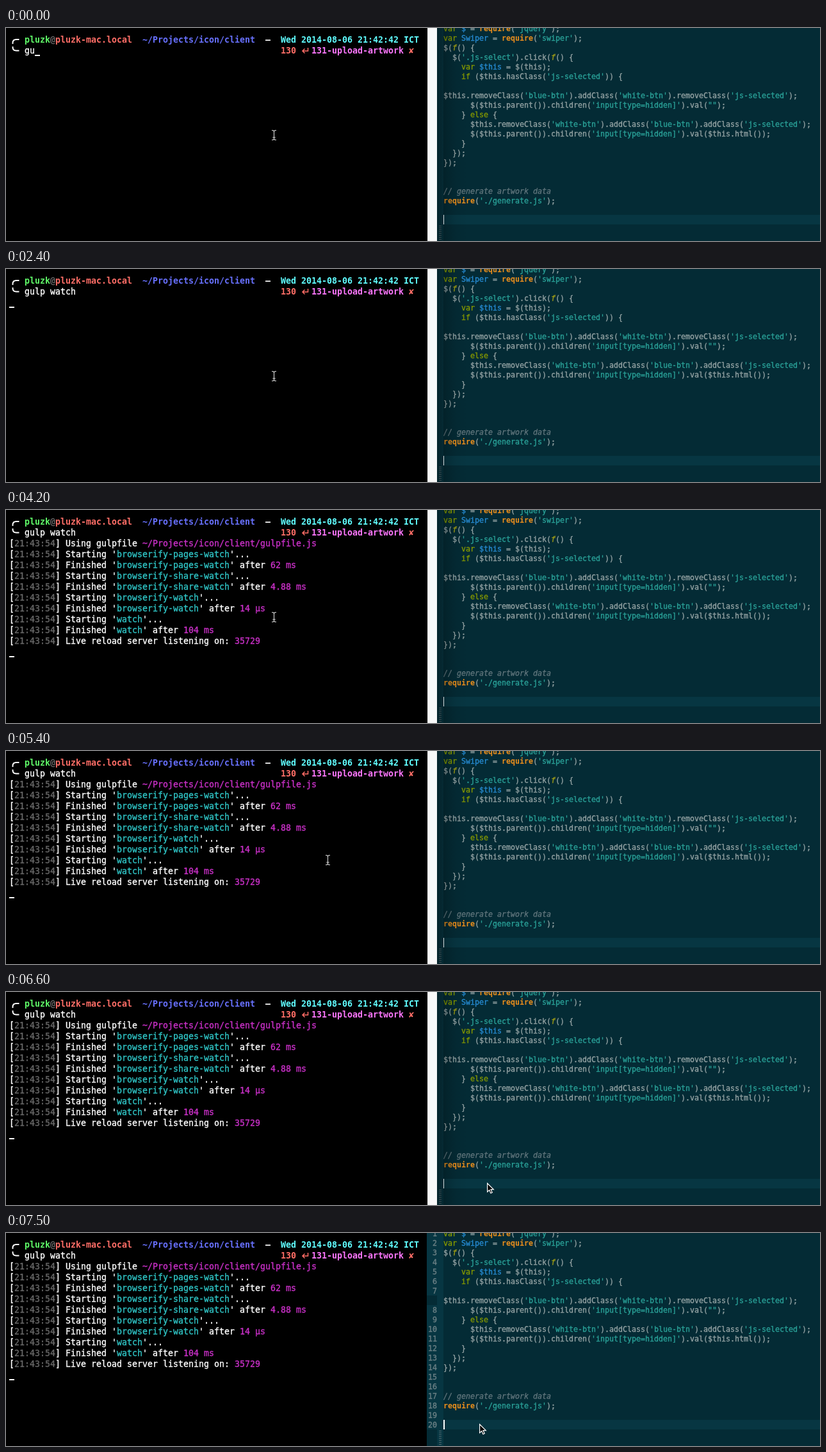
These frames come from a looping animation (1271x334 px, 8 s). An HTML page with a canvas:

```html
<!DOCTYPE html>
<html lang="en">
<head>
<meta charset="utf-8">
<title>Terminal and editor</title>
<style>
  html, body { margin: 0; width: 100%; height: 100%; overflow: hidden; background: #000; }
  canvas { display: block; }
</style>
</head>
<body>
<canvas id="stage" width="1271" height="334"></canvas>
<script>
const W = 1271, H = 334, LOOP = 8000;
const ctx = document.getElementById('stage').getContext('2d');

const MONO = '"DejaVu Sans Mono", monospace';
const TERM = { cell: 8, size: 13.29, x: 5, base: 23, row: 17 };
const EDIT = { cell: 7, size: 11.63, x: 683, base: 5, row: 15 };

const white = '#ffffff', gray = '#686868', red = '#ff6e67', magenta = '#c930c7', cyan = '#2fc3c4';
const panel = '#042b35', raised = '#073642', body = '#93a2a3', muted = '#5f747b';

// Each change: [time, value]; the value holds until the next one.
const TYPED = [[0, 2], [150, 3], [300, 4], [900, 5], [1050, 6], [1200, 7], [1500, 8], [1650, 9], [1800, 10]];
const PRINTED = [[0, 0], [4050, 8], [4200, 10]];
const POINTER = [
  [0, ['beam', 418, 168]], [5400, ['beam', 502, 171]],
  [5550, ['arrow', 830, 191]], [5700, ['arrow', 850, 236]], [5850, ['arrow', 790, 277]],
  [6000, ['arrow', 751, 289]], [6450, ['arrow', 751, 293]], [6600, ['arrow', 751, 299]],
  [7050, ['arrow', 744, 299]], [7200, ['arrow', 741, 299]], [7500, ['arrow', 739, 299]]
];
const ENTER = 2400, FOCUS = 6750;
const COMMAND = 'gulp watch';

const PROMPT = [
  [0, 3, 'pluzk', '#5ffa68'], [0, 8, '@', gray], [0, 9, 'pluzk-mac.local', red],
  [0, 26, '~/Projects/icon/client', '#6871ff'], [0, 50, '–', white],
  [0, 53, 'Wed 2014-08-06 21:42:42 ICT', '#60fdff'],
  [1, 53, '130', red], [1, 59, '131-upload-artwork', '#ff77ff'], [1, 78, '✘', red]
];

const LOG = [
  'Using gulpfile ~/Projects/icon/client/gulpfile.js',
  "Starting 'browserify-pages-watch'...",
  "Finished 'browserify-pages-watch' after 62 ms",
  "Starting 'browserify-share-watch'...",
  "Finished 'browserify-share-watch' after 4.88 ms",
  "Starting 'browserify-watch'...",
  "Finished 'browserify-watch' after 14 µs",
  "Starting 'watch'...",
  "Finished 'watch' after 104 ms",
  'Live reload server listening on: 35729'
].map(line => '[21:43:54] ' + line);

const CODE = [
  "var $ = require('jquery');",
  "var Swiper = require('swiper');",
  "$(f() {",
  "  $('.js-select').click(f() {",
  "    var $this = $(this);",
  "    if ($this.hasClass('js-selected')) {",
  "",
  "$this.removeClass('blue-btn').addClass('white-btn').removeClass('js-selected');",
  "      $($this.parent()).children('input[type=hidden]').val(\"\");",
  "    } else {",
  "      $this.removeClass('white-btn').addClass('blue-btn').addClass('js-selected');",
  "      $($this.parent()).children('input[type=hidden]').val($this.html());",
  "    }",
  "  });",
  "});",
  "", "",
  "// generate artwork data",
  "require('./generate.js');"
];

const LOG_RULES = [
  [/(?<=\[)[\d:]+(?=\])/g, gray],
  [/(?<=')[\w-]+(?=')/g, cyan],
  [/~\S+|\d[\d.]*( [mµ]s)?$/g, magenta]
];
const CODE_RULES = [
  [/\b(var|if|else)\b/g, '#859900'],
  [/(?<=var )\S+/g, '#268bd2'],
  [/\brequire\b/g, '#ed8f1c', 'bold'],
  [/(?<=\()f(?=\()/g, '#a3a014', 'italic'],
  [/'[^']*'|""/g, '#2aa198'],
  [/^\/\/.*/g, muted, 'italic']
];

function at(track, t) {
  let value = track[0][1];
  for (const [time, next] of track) if (t >= time) value = next;
  return value;
}

function box(color, x, y, w, h) {
  ctx.fillStyle = color;
  ctx.fillRect(x, y, w, h);
}

function glyph(grid, row, col, char, color, style = '') {
  const x = grid.x + col * grid.cell, y = grid.base + row * grid.row;
  ctx.font = `${style} ${grid.size}px ${MONO}`;
  ctx.fillStyle = ctx.strokeStyle = color;
  ctx.fillText(char, x, y);
  if (style !== 'bold') {
    ctx.lineWidth = 0.35;
    ctx.strokeText(char, x, y);
  }
}

function write(grid, row, col, text, color, style) {
  [...text].forEach((char, i) => {
    if (char !== ' ') glyph(grid, row, col + i, char, color, style);
  });
}

// Colours a line by its rules, later rules winning.
function writeStyled(grid, row, line, rules, base) {
  const looks = Array(line.length).fill([base, '']);
  for (const [pattern, color, style] of rules)
    for (const match of line.matchAll(pattern))
      looks.fill([color, style], match.index, match.index + match[0].length);
  [...line].forEach((char, i) => {
    if (char !== ' ') glyph(grid, row, i, char, ...looks[i]);
  });
}

function line(path, color, width) {
  ctx.strokeStyle = color;
  ctx.lineWidth = width;
  ctx.stroke(new Path2D(path));
}

function drawTerminal(t) {
  box('#000', 0, 0, 658, H);
  line('M10.5 25 V23.5 Q10.5 18 16 18 H20.5', white, 1.9);
  line('M10.5 29 V30 Q10.5 35.5 16 35.5 H20.5', white, 1.9);
  for (const [row, col, text, color] of PROMPT) write(TERM, row, col, text, color, 'bold');
  line('M471.5 31 V36 H463 M466.5 32.5 L463 36 L466.5 39.5', red, 1.5);

  const typed = at(TYPED, t), printed = at(PRINTED, t);
  write(TERM, 1, 3, COMMAND.slice(0, typed), white);
  LOG.slice(0, printed).forEach((text, i) => writeStyled(TERM, i + 2, text, LOG_RULES, white));

  const entered = t >= ENTER;
  const row = entered ? printed + 2 : 1, col = entered ? 0 : 3 + typed;
  box(white, TERM.x + col * TERM.cell, TERM.base + row * TERM.row + 2, 8, 2);
}

// The terminal's scroll bar and the shadow its window casts on the editor.
function drawOverlap() {
  box('#000', 657, 0, 1, H);
  box('#f8f8f8', 658, 0, 15, H);
  box('#e8e8e8', 658, 0, 1, H);
  const shade = ctx.createLinearGradient(673, 0, 722, 0);
  shade.addColorStop(0, 'rgba(0,0,0,.36)');
  shade.addColorStop(0.3, 'rgba(0,0,0,.17)');
  shade.addColorStop(0.6, 'rgba(0,0,0,.05)');
  shade.addColorStop(1, 'rgba(0,0,0,0)');
  box(shade, 673, 0, 49, H);
}

function drawEditor(focused) {
  box(panel, 657, 0, W - 657, H);
  box(raised, 673, 0, 10, H);
  box(raised, 683, 293, W - 683, 15);
  for (let y = 310; y < H; y += 3) box('#4d676e', 676, y, 4, 1);

  if (focused) {
    for (let n = 1; n <= 20; n++) {
      const row = n < 8 ? n - 1 : n;
      box(raised, 657, row * 15 - 7, 16, 15);
      write(EDIT, row, n < 10 ? -2.43 : -3.43, String(n), '#6b8085');
    }
  }
  CODE.forEach((text, row) => writeStyled(EDIT, row, text, CODE_RULES, body));
  if (!focused) drawOverlap();
  box(focused ? white : '#d5dcdd', 683, 293, focused ? 2 : 1, 15);
}

function drawPointer([kind, x, y]) {
  ctx.save();
  ctx.translate(x, y);
  if (kind === 'beam') {
    line('M-3 -7.5 H-1.5 Q.5 -7.5 .5 -5 V5 Q.5 7.5 -1.5 7.5 H-3 M4 -7.5 H2.5 Q.5 -7.5 .5 -5 M4 7.5 H2.5 Q.5 7.5 .5 5 M-1.5 3.5 H2.5', '#d8d8d8', 1.1);
  } else {
    const arrow = new Path2D('M.6 1 V14.4 L3.7 11.5 L5.9 16.5 L8.2 15.5 L6 10.6 H10.3 Z');
    ctx.fillStyle = '#000';
    ctx.fill(arrow);
    ctx.strokeStyle = white;
    ctx.lineWidth = 1.2;
    ctx.stroke(arrow);
  }
  ctx.restore();
}

function draw(t) {
  ctx.clearRect(0, 0, W, H);
  drawTerminal(t);
  drawEditor(t >= FOCUS);
  drawPointer(at(POINTER, t));
}

const start = performance.now();
function tick() {
  draw((performance.now() - start) % LOOP);
  requestAnimationFrame(tick);
}
tick();
</script>
</body>
</html>
```
